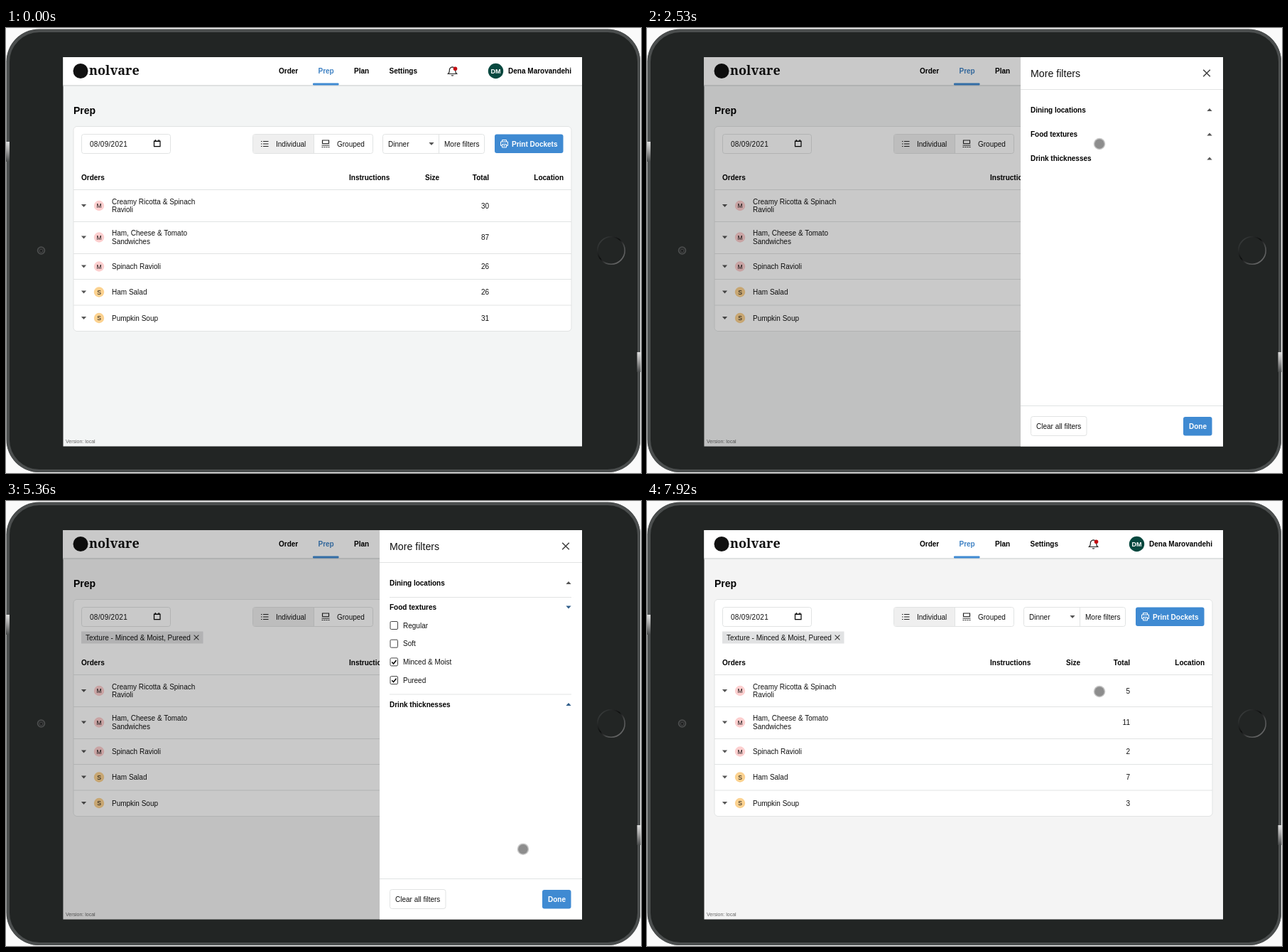
Write an HTML page that moves like this. It is 894 by 626 pixels and loops after 7990 ms.

```html
<!DOCTYPE html>
<html lang="en">
<head>
<meta charset="utf-8">
<title>Prep filters</title>
<style>
  html, body { margin: 0; width: 100%; height: 100%; overflow: hidden; background: #fafafa; }
  svg { display: block; }
  text { font: 10px "Liberation Sans", Arial, sans-serif; fill: #111; white-space: pre; }
  .b { font-weight: bold; fill: #000; }
  .brand { font: bold 18px "Noto Serif", serif; fill: #111; }
  .end { text-anchor: end; }
  .mid { text-anchor: middle; }
  .line { stroke: #e1e3e3; fill: none; }
  .box { stroke: #e1e3e3; fill: #fff; }
  .icon { stroke: #222; fill: none; stroke-width: 1.2; }
  .cross { stroke: #444; fill: none; }
  .caret { fill: #555; }
</style>
</head>
<body>
<svg id="stage" width="894" height="626" viewBox="0 0 894 626"></svg>
<script>
const LOOP = 7990, FRAME = 1000 / 15, BLUE = '#3f8ad2';
const OPEN = 2030, EXPAND = 3040, CLOSE = 6025;
const DRAWER_X = 526, DRAWER_WIDTH = 285;
const clicks = [1930, 2930, 3930, 4660, 5950];
const pointerPath = [
  [790, 850, 598], [1600, 639, 159.5], [2200, 639, 159.5], [2530, 637, 163],
  [2740, 623, 153], [3100, 623, 153], [3800, 590, 227], [4100, 590, 227],
  [4560, 578, 250], [4780, 578, 250], [5620, 773.5, 562.5], [6780, 773.5, 562.5],
  [7660, 637.5, 269], [7860, 637, 268],
];

// y is the optical middle of the capitals
const text = (x, y, s, cls = '', style = '') =>
  `<text x="${x}" y="${y + 3.6}" class="${cls}" style="${style}">${s.replace(/&/g, '&amp;')}</text>`;
const rect = (x, y, w, h, attrs = '') =>
  `<rect x="${x}" y="${y}" width="${w}" height="${h}" ${attrs}/>`;
const circle = (x, y, r, attrs = '') => `<circle cx="${x}" cy="${y}" r="${r}" ${attrs}/>`;
const path = (d, cls = 'icon', attrs = '') => `<path d="${d}" class="${cls}" ${attrs}/>`;
const hline = (x1, x2, y, attrs = '') => path(`M${x1} ${y}H${x2}`, 'line', attrs);
const caretDown = (x, y) => path(`M${x - 3.6} ${y - 1.9}h7.2l-3.6 3.8z`, 'caret');
const caretUp = (x, y) => path(`M${x - 3.6} ${y + 1.9}h7.2l-3.6 -3.8z`, 'caret');
const cross = (x, y, r, width) =>
  path(`M${x - r} ${y - r}l${2 * r} ${2 * r}m0 ${-2 * r}l${-2 * r} ${2 * r}`, 'cross', `stroke-width="${width}"`);

const rows = [
  { y: 250, bottom: 272.5, kind: 'M', name: ['Creamy Ricotta & Spinach', 'Ravioli'], totals: [30, 5] },
  { y: 294.5, bottom: 317.5, kind: 'M', name: ['Ham, Cheese & Tomato', 'Sandwiches'], totals: [87, 11] },
  { y: 335.5, bottom: 353.5, kind: 'M', name: ['Spinach Ravioli'], totals: [26, 2] },
  { y: 371.5, bottom: 390, kind: 'S', name: ['Ham Salad'], totals: [26, 7] },
  { y: 408, kind: 'S', name: ['Pumpkin Soup'], totals: [31, 3] },
];

const rowMarkup = ({ y, bottom, kind, name, totals }) =>
  caretDown(109.5, y) +
  circle(131, y, 7.2, `fill="${kind === 'M' ? '#fdcfcf' : '#fcd290'}"`) +
  text(131, y - .5, kind, 'mid', 'font-size:8.5px') +
  name.map((s, i) => text(149, y + (i - (name.length - 1) / 2) * 11.5, s)).join('') +
  text(680, y, String(totals[0]), 'end total') +
  (bottom ? hline(95, 796, bottom) : '');

const device = `
  <defs>
    <linearGradient id="button" x1="0" y1="0" x2="1" y2="1">
      <stop offset=".1" stop-color="#3c3f3f"/><stop offset=".45" stop-color="#0c0d0d"/>
      <stop offset=".65" stop-color="#4b4d4d"/><stop offset="1" stop-color="#777"/>
    </linearGradient>
    <linearGradient id="glint" x1="0" y1="0" x2="0" y2="1">
      <stop offset="0" stop-color="#ddd"/><stop offset=".4" stop-color="#aaa"/>
      <stop offset="1" stop-color="#4b4d4d"/>
    </linearGradient>
    <clipPath id="screen">${rect(80.5, 41, 730.5, 547.5)}</clipPath>
    <clipPath id="fold">${rect(530, 160, 280, 0, 'id="foldBox"')}</clipPath>
  </defs>` +
  rect(.5, 1.5, 892.5, 623.5, 'rx="46" fill="#353838"') +
  rect(3, 4, 888, 619, 'rx="44" fill="#222524" stroke="#4b4e4e" stroke-width="4"') +
  rect(6.5, 8, 881, 611, 'rx="41" fill="#222524"') +
  rect(0, 160, 5, 28, 'fill="url(#glint)"') + rect(888.5, 456, 5, 28, 'fill="url(#glint)"') +
  circle(49.5, 313, 5, 'fill="#2c2e2e" stroke="#4c4e4e" stroke-width="1.6"') +
  circle(49.5, 313.5, 2, 'fill="#171919" stroke="#555" stroke-width=".7"') +
  circle(852, 313, 19.2, 'fill="#222524" stroke="url(#button)" stroke-width="1.6"');

const header =
  rect(80, 41, 731, 41, 'fill="#dfe1e1"') + rect(80, 41, 731, 39, 'fill="#fff"') +
  circle(105, 60.5, 10.5, 'fill="#111"') +
  text(117, 61.9, 'nolvare', 'brand') +
  text(384, 60.5, 'Order', 'b') + text(439.5, 60.5, 'Prep', 'b', 'fill:#3f82c4') +
  rect(432, 77.5, 36.5, 3, `rx="1" fill="${BLUE}"`) +
  text(490, 60.5, 'Plan', 'b') + text(539.5, 60.5, 'Settings', 'b') +
  path('M622.5 64.5h12q-1.8-1.4-1.8-4.5v-1q-.4-3.8-4.2-4.2q-3.8 .4-4.2 4.2v1q0 3.1-1.8 4.5zM627 66.5q1.5 1 3 0') +
  circle(632.5, 57.3, 2.8, 'fill="#c30d12"') +
  circle(689.5, 60.5, 10.7, 'fill="#07483f"') +
  text(689.5, 60.5, 'DM', 'b mid', 'fill:#fff;font-size:9px') +
  text(796, 60.5, 'Dena Marovandehi', 'b end');

const toolbar =
  rect(106.5, 149.5, 125, 27, 'rx="3" class="box"') +
  text(118, 163, '08/09/2021', '', 'letter-spacing:.3px') +
  path('M208.5 159h8.5v7.7h-8.5zM208 159.5h9.5M210.3 157v2M215.2 157v2', 'icon', 'style="stroke:#000"') +
  rect(347.5, 149.5, 169, 27, 'rx="3" class="box"') +
  rect(348, 150, 85.5, 26, 'fill="#efefef"') + path('M433.5 149.5v27', 'line') +
  [159.5, 163, 166.5].map(y => path(`M359 ${y}h1.5M362 ${y}h7.5`)).join('') +
  text(380, 163, 'Individual') +
  path('M445.5 158h9v4.5h-9zM444.5 165h11M444.5 167.5h2m1 0h2m1 0h2m1 0h2') +
  text(466, 163, 'Grouped') +
  rect(530.5, 149.5, 143, 27, 'rx="3" class="box"') + path('M609.5 149.5v27', 'line') +
  text(538, 163, 'Dinner') + caretDown(599, 163) + text(617, 163, 'More filters') +
  rect(688, 149.5, 96.5, 26.5, `rx="3" fill="${BLUE}"`) +
  path('M698.5 160v-2.5h6v2.5M698.5 165.5h-2v-5.5h10v5.5h-2M698.5 163.5h6v4.5h-6zM700 165.7h3', 'icon', 'style="stroke:#fff;stroke-width:1"') +
  text(712, 163, 'Print Dockets', 'b', 'fill:#fff');

const page =
  rect(80, 41, 731, 548, 'id="pageBack"') + header +
  text(95, 117.6, 'Prep', 'b', 'font-size:14px') +
  rect(95, 138.5, 701, 288, 'id="card" rx="5" class="box"') + toolbar +
  `<g id="chip">${rect(106, 183.5, 134, 17, 'id="chipBox" fill="#e1e2e3"')}
    <text id="chipText" x="112" y="195.6"></text>
    <g id="chipCross">${cross(0, 192, 3.4, 1.2)}</g></g>
  <g id="table">` +
  text(106, 210.5, 'Orders', 'b') + text(483, 210.5, 'Instructions', 'b') +
  text(590, 210.5, 'Size', 'b') + text(680, 210.5, 'Total', 'b end') +
  text(785, 210.5, 'Location', 'b end') + hline(95, 796, 227.5) +
  rows.map(rowMarkup).join('') + '</g>' +
  text(84, 580, 'Version: local', '', 'font-size:7px;fill:#666');

const checkbox = (label, i) => {
  const y = 175 + i * 25.7;
  return rect(541, y - 5.5, 10.5, 11, 'rx="1.5" fill="#fff" stroke="#444"') +
    path(`M543.3 ${y + .2}l2.2 2.4l4 -5`, 'icon tick', 'style="stroke:#000;stroke-width:1.5"') +
    text(559, y, label);
};

const drawer =
  rect(DRAWER_X, 41, DRAWER_WIDTH, 548, 'fill="#fff"') +
  text(540, 65.2, 'More filters', '', 'font-size:14.2px') + cross(788, 63.5, 4.8, 1.6) +
  hline(DRAWER_X, 811, 86.5) + text(540, 115, 'Dining locations', 'b') + caretUp(792, 115) +
  hline(540, 796, 135.5, 'data-fold') + text(540, 149.5, 'Food textures', 'b') +
  `<g id="foodCaret">${caretUp(792, 149.5)}</g>
  <g clip-path="url(#fold)">${['Regular', 'Soft', 'Minced & Moist', 'Pureed'].map(checkbox).join('')}</g>
  <g id="drinks">` + hline(540, 796, 169.5, 'data-fold') +
  text(540, 183.5, 'Drink thicknesses', 'b') + `<g id="drinkCaret">${caretUp(792, 183.5)}</g></g>` +
  hline(DRAWER_X, 811, 531.5) +
  rect(540.5, 546.5, 78.5, 27, 'rx="3" class="box"') + text(548, 560, 'Clear all filters') +
  rect(755, 547, 40.5, 26.5, `rx="3" fill="${BLUE}"`) + text(763, 560, 'Done', 'b', 'fill:#fff');

const $ = id => document.getElementById(id);
$('stage').innerHTML = device +
  `<g clip-path="url(#screen)">${page}
    ${rect(80, 41, 0, 548, 'id="shade"')}<g id="drawer">${drawer}</g></g>
  <g id="pointer">${circle(0, 0, 8.3, 'id="halo"') + circle(0, 0, 6.8, 'id="dot"')}</g>`;

const totals = [...document.querySelectorAll('.total')];
const ticks = [...document.querySelectorAll('.tick')];
const folds = [...document.querySelectorAll('[data-fold]')];

const set = (el, attrs) => { for (const k in attrs) el.setAttribute(k, attrs[k]); };
const show = (el, on) => el.setAttribute('visibility', on ? 'visible' : 'hidden');
const clamp = v => Math.min(1, Math.max(0, v));
const easeInOut = u => u < .5 ? 2 * u * u : 1 - 2 * (1 - u) ** 2;
const progress = (t, start, length = 300) => clamp((t - start) / length);

function pointerAt(t) {
  const i = pointerPath.findIndex(p => p[0] > t);
  if (i < 1) return (i ? pointerPath.at(-1) : pointerPath[0]).slice(1);
  const [a, b] = [pointerPath[i - 1], pointerPath[i]];
  const u = easeInOut((t - a[0]) / (b[0] - a[0]));
  return [a[1] + (b[1] - a[1]) * u, a[2] + (b[2] - a[2]) * u];
}

function drawPage(t) {
  const filtered = t >= 4125, both = t >= 4855, shift = filtered ? 17 : 0;
  set($('pageBack'), { fill: filtered ? '#f4f4f4' : '#f3f5f5' });
  show($('chip'), filtered);
  $('chipText').textContent = 'Texture - Minced & Moist' + (both ? ', Pureed' : '');
  set($('chipBox'), { width: both ? 171.5 : 134 });
  set($('chipCross'), { transform: `translate(${both ? 268 : 230.5} 0)` });
  set($('table'), { transform: `translate(0 ${shift})` });
  set($('card'), { height: 288 + shift });
  totals.forEach((el, i) => { el.textContent = rows[i].totals[+filtered]; });
}

function drawDrawer(t, frameTime) {
  const closing = t >= 6080;
  const u = progress(frameTime, closing ? CLOSE : OPEN);
  const eased = 1 - (1 - u) ** 2;
  const shift = DRAWER_WIDTH * (closing ? eased : 1 - eased);
  const opacity = closing ? (1 - u) ** 1.5 : 1 - (1 - u) ** 1.5;
  set($('drawer'), { transform: `translate(${shift} 0)`, opacity });
  set($('shade'), { width: DRAWER_X - 80 + shift, 'fill-opacity': .21 * opacity });

  const open = easeInOut(progress(frameTime, EXPAND));
  set($('foldBox'), { height: 103 * open });
  set($('drinks'), { transform: `translate(0 ${102.5 * open})` });
  set($('foodCaret'), { transform: `rotate(${180 * open} 792 149.5)` });
  folds.forEach(el => set(el, { opacity: open }));
  ['foodCaret', 'drinkCaret'].forEach(id => { $(id).firstChild.style.fill = open ? '#2f5d8a' : ''; });
  ticks.forEach((el, i) => show(el, i === 2 && t >= 4060 || i === 3 && t >= 4790));
}

function drawPointer(t, frameTime) {
  const pressed = clicks.some(c => t >= c && t < c + 135);
  show($('pointer'), t >= 790);
  set($('pointer'), { transform: `translate(${pointerAt(frameTime)})` });
  set($('halo'), { fill: pressed ? '#d8d020' : '#000', 'fill-opacity': pressed ? .6 : .22 });
  set($('dot'), { fill: pressed ? '#c4bc00' : '#000', 'fill-opacity': pressed ? .6 : .29 });
}

function draw(now) {
  const t = now % LOOP;
  const frameTime = Math.floor((t + 15) / FRAME) * FRAME;
  drawPage(t);
  drawDrawer(t, frameTime);
  drawPointer(t, frameTime);
}

const start = performance.now();
function tick() {
  draw(performance.now() - start);
  requestAnimationFrame(tick);
}
tick();
</script>
</body>
</html>
```
